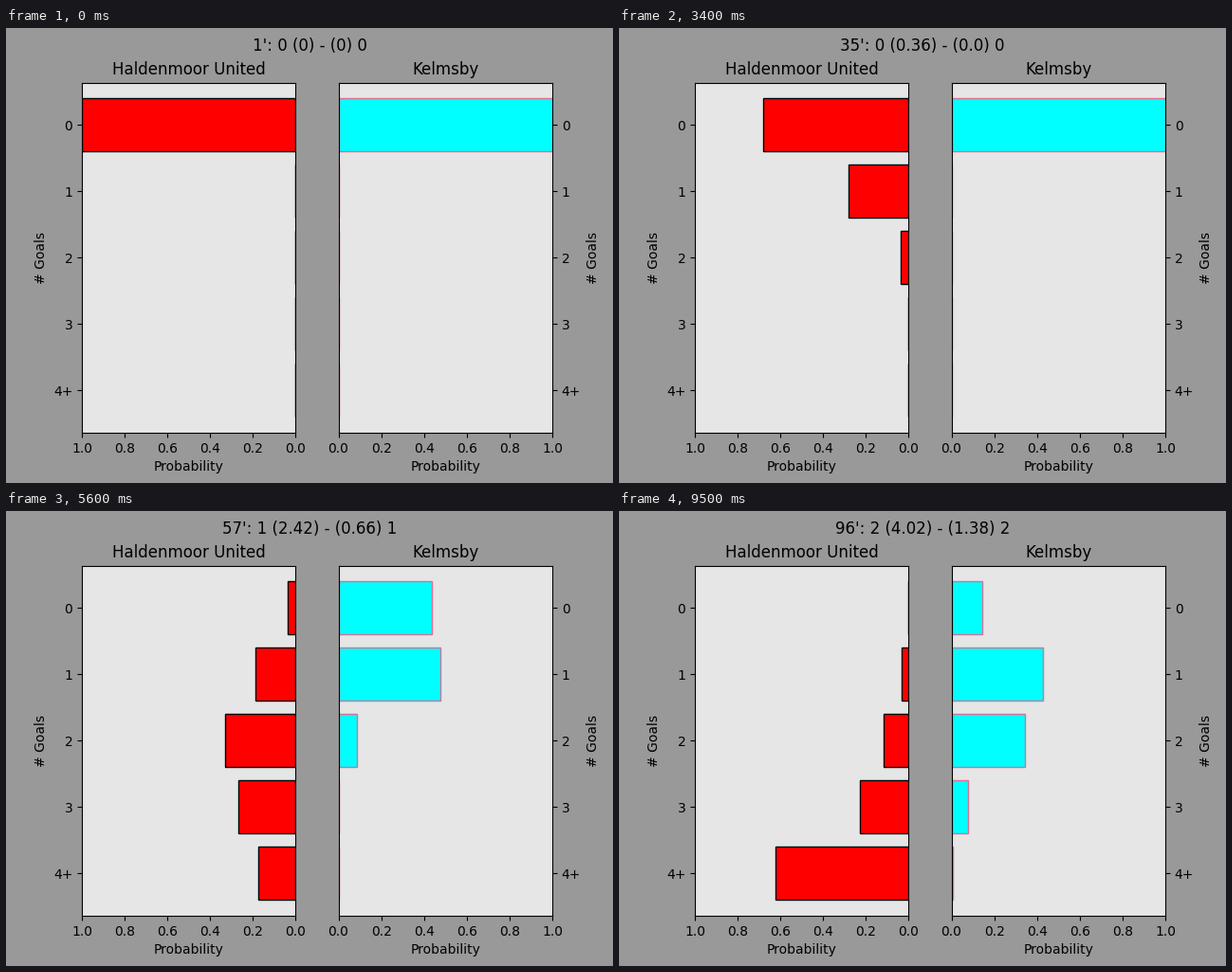
These frames come from a looping animation (640x480 px, 9600 ms). A matplotlib script:

```python
import matplotlib.pyplot as plt
import numpy as np
from matplotlib.animation import FuncAnimation

MINUTES = 96
LABELS = ["0", "1", "2", "3", "4+"]


class Team:
    """Main chances come at a steady pace, minor ones in given minutes."""

    def __init__(self, start, step, chances, minor_at, minor, goals):
        self.shots = [(start + step * k, p) for k, p in enumerate(chances)]
        self.shots += [(minute, minor) for minute in minor_at]
        self.goals = goals

    def state(self, minute):
        taken = [p for at, p in self.shots if at <= minute]
        scored = sum(at <= minute for at in self.goals)
        return scored, round(sum(taken), 2), goal_probs(taken)


def goal_probs(chances):
    """Probability of 0, 1, 2, 3 and 4+ goals from independent shots."""
    dist = np.array([1.0])
    for p in chances:
        dist = np.convolve(dist, [1 - p, p])
    dist = np.pad(dist, (0, len(LABELS)))
    return [*dist[:4], dist[4:].sum()]


def setup(ax, name, xlim, face, edge):
    bars = ax.barh(range(5), goal_probs([]), color=face, edgecolor=edge)
    ax.set_facecolor("0.9")
    ax.set_title(name)
    ax.set_xlim(*xlim)
    ax.invert_yaxis()
    ax.set_yticks(range(5), LABELS)
    ax.set_xlabel("Probability")
    ax.set_ylabel("# Goals")
    return bars


home = Team(5, 8, [0.018, 0.148, 0.06, 0.135, 0.1, 0.56,
                   0.72, 0.35, 0, 0.16, 0.23, 0.75],
            minor_at=[*range(43, 48), 50, 66], minor=0.113, goals=[53, 93])
away = Team(28, 9, [0.002, 0.105, 0.081, 0.47, 0.64],
            minor_at=[66], minor=0.08, goals=[55, 64])

fig, (left, right) = plt.subplots(1, 2, figsize=(6.4, 4.8), dpi=100)
fig.set_facecolor("0.6")
home_bars = setup(left, "Haldenmoor United", (1, 0), "red", "black")
away_bars = setup(right, "Kelmsby", (0, 1), "cyan", "palevioletred")
right.yaxis.tick_right()
right.yaxis.set_label_position("right")
title = fig.suptitle("")


def update(i):
    minute = i + 1
    home_goals, home_xg, home_probs = home.state(minute)
    away_goals, away_xg, away_probs = away.state(minute)
    for bars, probs in ((home_bars, home_probs), (away_bars, away_probs)):
        for bar, p in zip(bars, probs):
            bar.set_width(p)
    title.set_text(
        f"{minute}': {home_goals} ({home_xg}) - ({away_xg}) {away_goals}")
    return [*home_bars, *away_bars, title]


anim = FuncAnimation(fig, update, frames=MINUTES, interval=100, repeat=True)
plt.show()
```
